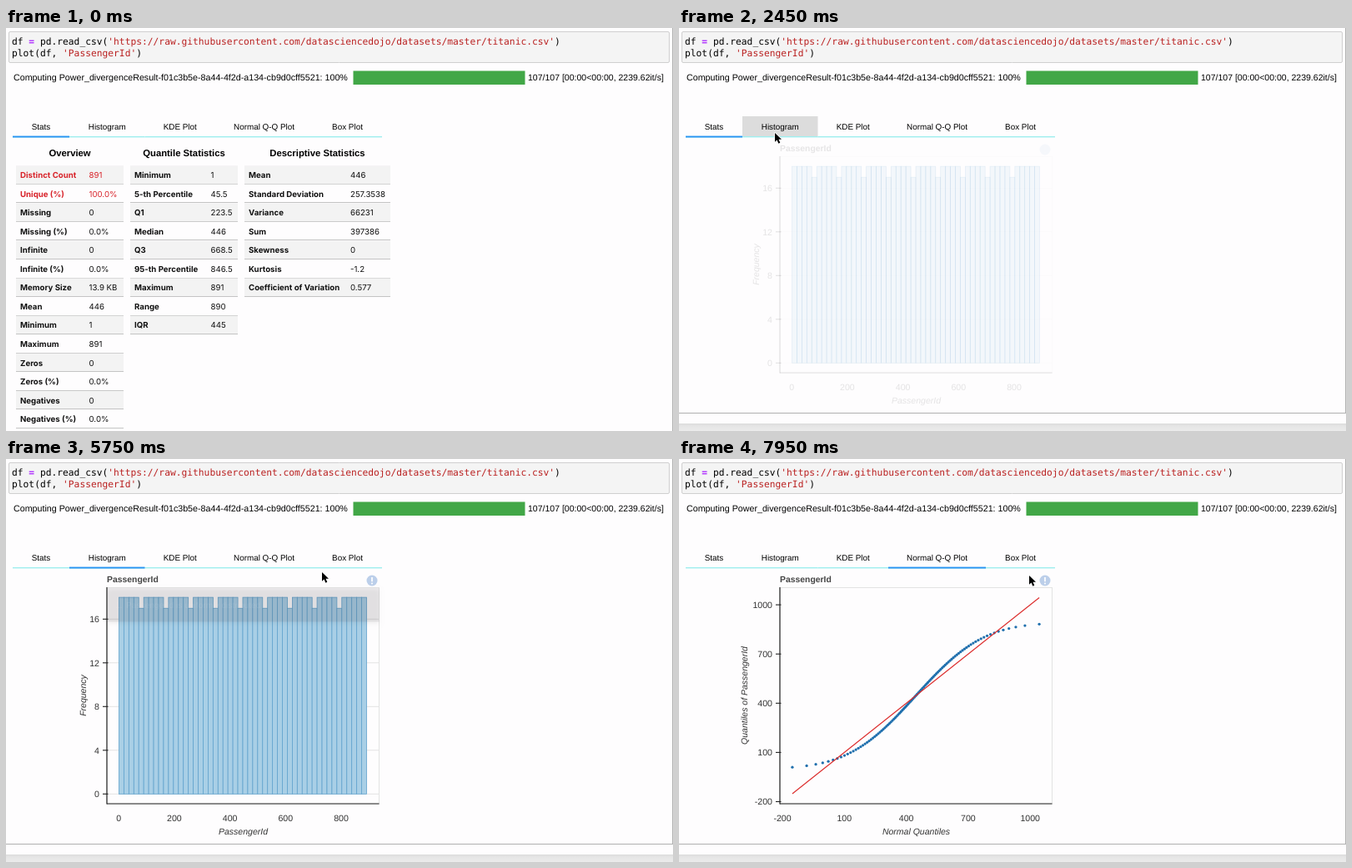
An HTML page with a canvas that plays this animation: 800 by 484 pixels, repeating every 8000 ms.

```html
<!DOCTYPE html>
<html lang="en">
<head>
<meta charset="utf-8">
<title>Column plot</title>
<style>
html, body { margin: 0; width: 100%; height: 100%; overflow: hidden; background: #fefdfe; }
canvas { display: block; width: 800px; height: 484px; }
</style>
</head>
<body>
<canvas id="stage"></canvas>
<script>
const W = 800, H = 484, LOOP = 8000, STEP = 50;
const canvas = document.getElementById('stage');
const ctx = canvas.getContext('2d');
const ratio = window.devicePixelRatio || 1;
canvas.width = W * ratio;
canvas.height = H * ratio;

const SANS = '"Liberation Sans", Arial, sans-serif';
const UI = 'Inter, "Open Sans", sans-serif';
const MONO = '"DejaVu Sans Mono", monospace';

const TABS = [
  ['Stats', 8, 76], ['Histogram', 76, 166.5], ['KDE Plot', 166.5, 251],
  ['Normal Q-Q Plot', 251, 368], ['Box Plot', 368, 451]
];
const TABLES = [
  { title: 'Overview', x: 12, right: 141, value: 99.5, rows: [
    ['Distinct Count', '891'], ['Unique (%)', '100.0%'], ['Missing', '0'],
    ['Missing (%)', '0.0%'], ['Infinite', '0'], ['Infinite (%)', '0.0%'],
    ['Memory Size', '13.9 KB'], ['Mean', '446'], ['Minimum', '1'],
    ['Maximum', '891'], ['Zeros', '0'], ['Zeros (%)', '0.0%'],
    ['Negatives', '0'], ['Negatives (%)', '0.0%']] },
  { title: 'Quantile Statistics', x: 149, right: 278, value: 245.5, rows: [
    ['Minimum', '1'], ['5-th Percentile', '45.5'], ['Q1', '223.5'],
    ['Median', '446'], ['Q3', '668.5'], ['95-th Percentile', '846.5'],
    ['Maximum', '891'], ['Range', '890'], ['IQR', '445']] },
  { title: 'Descriptive Statistics', x: 286, right: 461, value: 413, rows: [
    ['Mean', '446'], ['Standard Deviation', '257.3538'], ['Variance', '66231'],
    ['Sum', '397386'], ['Skewness', '0'], ['Kurtosis', '-1.2'],
    ['Coefficient of Variation', '0.577']] }
];
const ROW_TOP = 165.2, ROW_H = 22.56;

// Pointer keys: time, x, y
const PATH = [
  [450, 91, 492], [800, 98, 372], [900, 99, 341], [1050, 101, 300.9],
  [1400, 109, 195], [1800, 115, 126], [2750, 115, 126], [3200, 270, 137],
  [3900, 443, 146], [5500, 443, 146], [5750, 379, 136], [6100, 210, 122],
  [6600, 210, 122], [7050, 294, 122], [7450, 294, 122], [7800, 400, 139],
  [7950, 420, 140]
];
const VIEWS = [[0, 0], [2420, 1], [6350, 2], [7420, 3]];
const FADE = 230, SWITCH = 120;
const TIP_IN = 4380, TIP_OUT = 5480;

const PLOT = { x: 121, y: 154, r: 447.5, b: 414 };
const clamp = v => Math.max(0, Math.min(1, v));

function text(str, x, y, font, color = '#000', align = 'left') {
  ctx.font = font;
  ctx.fillStyle = color;
  ctx.textAlign = align;
  ctx.fillText(str, x, y);
}

function rect(x, y, w, h, color) {
  ctx.fillStyle = color;
  ctx.fillRect(x, y, w, h);
}

function line(x1, y1, x2, y2, color, width = 1) {
  ctx.strokeStyle = color;
  ctx.lineWidth = width;
  ctx.beginPath();
  ctx.moveTo(x1, y1);
  ctx.lineTo(x2, y2);
  ctx.stroke();
}

function disc(x, y, r, color) {
  ctx.fillStyle = color;
  ctx.beginPath();
  ctx.arc(x, y, r, 0, Math.PI * 2);
  ctx.fill();
}

function code(parts, x, y) {
  for (const [str, color, weight = ''] of parts) {
    text(str, x, y, `${weight} 11.27px ${MONO}`, color);
    x += ctx.measureText(str).width;
  }
}

function drawCell() {
  ctx.beginPath();
  ctx.roundRect(3.5, 4.5, 792, 37, 1.5);
  ctx.fillStyle = '#f4f4f4';
  ctx.fill();
  ctx.strokeStyle = '#cfcfcf';
  ctx.lineWidth = 1;
  ctx.stroke();
  const red = '#ba2121';
  code([['df ', '#000'], ['=', '#aa22ff', 'bold'], [' pd.read_csv(', '#000'],
    ["'https://raw.githubusercontent.com/datasciencedojo/datasets/master/titanic.csv'", red],
    [')', '#000']], 7, 20);
  code([['plot(df, ', '#000'], ["'PassengerId'", red], [')', '#000']], 7, 33.5);

  text('Computing Power_divergenceResult-f01c3b5e-8a44-4f2d-a134-cb9d0cff5521: 100%',
    9, 63, `10.69px ${SANS}`);
  rect(416.5, 51.5, 206, 16.5, '#42a747');
  text('107/107 [00:00<00:00, 2239.62it/s]', 626, 63, `10.53px ${SANS}`);
}

function drawFrame(short) {
  line(799.5, 0, 799.5, short ? 462.5 : H, '#b5b5b5');
  if (!short) return;
  line(0, 462.5, 800, 462.5, '#b0b0b0');
  const band = ctx.createLinearGradient(0, 474, 0, H);
  band.addColorStop(0, '#d8d8d8');
  band.addColorStop(0.4, '#e5e5e5');
  band.addColorStop(1, '#ebebeb');
  rect(0, 475, W, 9, band);
}

function drawTabs(active, p) {
  TABS.forEach(([name, x, r], i) => {
    if (p && p.y >= 106 && p.y < 131 && p.x >= x && p.x < r) rect(x, 106, r - x, 24.5, '#dcdcdc');
    text(name, (x + r) / 2, 121.5, `9.88px ${SANS}`, '#000', 'center');
    rect(x, 130, r - x, 1.4, '#9eeeee');
  });
  const [, x, r] = TABS[active];
  rect(x, 129.6, r - x, 1.9, '#2694f2');
}

function drawTables(p) {
  for (const { title, x, right, value, rows } of TABLES) {
    text(title, (x + right) / 2, 153.7, `bold 11.3px ${SANS}`, '#000', 'center');
    rows.forEach(([label, val], i) => {
      const y = ROW_TOP + i * ROW_H;
      const hover = p && p.x >= x && p.x < right && p.y >= y && p.y < y + ROW_H;
      rect(x, y, right - x, ROW_H, hover ? '#d0e6f9' : i % 2 ? '#fefdfe' : '#f3f3f3');
      const edge = Math.round(y + ROW_H) - 0.5;
      line(x, edge, right, edge, '#c4c4c4');
      const color = x === 12 && i < 2 ? '#d8232a' : '#111';
      const base = y + ROW_H / 2 + 3.5;
      text(label, x + 5, base, `bold 9.66px ${UI}`, color);
      text(val, value, base, `9.66px ${UI}`, color);
    });
  }
}

function drawAxes(xs, ys, xName, yName, yNameX, grid) {
  const { x, y, r, b } = PLOT;
  ctx.strokeStyle = '#e3e3e3';
  ctx.lineWidth = 1;
  ctx.strokeRect(x, y + 0.5, r - x, b - y);
  const font = `10.6px ${SANS}`;
  for (const [label, py] of ys) {
    if (grid) line(x, py, r, py, '#e3e3e3');
    text(label, 112, py + 3.8, font, '#333', 'right');
  }
  for (const [label, px] of xs) text(label, px, 434.8, font, '#333', 'center');
  text(xName, 284.5, 451.3, `italic 10.5px ${SANS}`, '#333', 'center');
  ctx.save();
  ctx.translate(yNameX, 284);
  ctx.rotate(-Math.PI / 2);
  text(yName, 0, 0, `italic 10.5px ${SANS}`, '#333', 'center');
  ctx.restore();
  text('PassengerId', x, 148, `bold 10.4px ${SANS}`, '#444');
}

function drawAxisLines(ys) {
  const { x, y, r, b } = PLOT;
  line(x, y, x, b + 0.5, '#222', 1.2);
  line(x, b, r, b, '#222', 1.2);
  for (const [, py] of ys) line(x - 5, py, x + 1.5, py, '#222', 1.1);
}

function drawBars() {
  const w = 297 / 50;
  ctx.strokeStyle = '#62a3ce';
  ctx.lineWidth = 0.8;
  for (let i = 0; i < 50; i++) {
    const h = (i % 5 === 4 && i < 49 ? 17 : 18) * 13.12;
    rect(135.5 + i * w, 402.3 - h, w, h, '#a9cfe6');
    ctx.strokeRect(135.5 + i * w, 402.3 - h, w, h);
  }
}

const ticks = (start, gap, count, pos, step, digits = 0) =>
  Array.from({ length: count }, (_, i) =>
    [i || start ? (start + i * gap).toFixed(digits) : '0', pos + i * step]);

const idTicks = ticks(0, 200, 5, 135.2, 66.7);

function drawHistogram() {
  const ys = ticks(0, 4, 5, 402.3, -52.5);
  drawAxes(idTicks, ys, 'PassengerId', 'Frequency', 95.5, true);
  drawBars();
  drawAxisLines(ys);
}

// Normal cumulative distribution, logistic approximation
const phi = z => 1 / (1 + Math.exp(-1.5976 * z - 0.07056 * z ** 3));

function quantile(p) {
  let lo = -4, hi = 4;
  for (let i = 0; i < 30; i++) {
    const mid = (lo + hi) / 2;
    if (phi(mid) < p) lo = mid; else hi = mid;
  }
  return lo;
}

function drawDensity() {
  const ys = ticks(0, 0.0003, 4, 402.3, -62.7, 4);
  drawAxes(idTicks, ys, 'PassengerId', 'Density', 72.8, true);
  drawBars();
  ctx.strokeStyle = '#8878c6';
  ctx.lineWidth = 1.2;
  ctx.beginPath();
  for (let x = 135.5; x <= 432.5; x++) {
    const d = phi((x - 135.5) / 22) + phi((432.5 - x) / 22) - 1;
    ctx.lineTo(x, 402.3 - 233.6 * d);
  }
  ctx.stroke();
  drawAxisLines(ys);
}

const NORMALS = Array.from({ length: 99 }, (_, i) => 446 + 257.35 * quantile((i + 1) / 100));

function drawQuantiles() {
  const ys = ticks(-200, 300, 5, 411.5, -59.1);
  const px = v => 124 + (v + 200) * 0.2477;
  const py = v => 411.5 - (v + 200) * 0.197;
  drawAxes(ticks(-200, 300, 5, 124, 74.3), ys, 'Normal Quantiles',
    'Quantiles of PassengerId', 82, false);
  NORMALS.forEach((v, i) => disc(px(v), py(1 + 8.9 * (i + 1)), 1.65, '#1f6fad'));
  const lo = NORMALS[0], hi = NORMALS[98];
  line(px(lo), py(lo), px(hi), py(hi), '#dc2a2a', 1.1);
  drawAxisLines(ys);
}

function drawIcon(open, hover) {
  disc(439, 146, 6.5, open || hover ? '#7292cb' : '#bccfea');
  if (open) {
    line(436.7, 143.7, 441.3, 148.3, '#fff', 1.7);
    line(441.3, 143.7, 436.7, 148.3, '#fff', 1.7);
  } else {
    line(439, 142, 439, 147.2, '#fff', 1.7);
    disc(439, 149.5, 1, '#fff');
  }
}

function drawTip(alpha) {
  if (alpha <= 0) return;
  ctx.save();
  ctx.globalAlpha = alpha;
  ctx.shadowColor = 'rgba(0,0,0,0.5)';
  ctx.shadowBlur = 5 * ratio;
  ctx.shadowOffsetY = 2 * ratio;
  rect(121.5, 155, 326, 40.5, '#4d4a4d');
  ctx.shadowColor = 'transparent';
  text('1.', 131, 179, `10.2px ${SANS}`, '#fff');
  text('PassengerId is uniformly distributed', 144, 179, `10.2px ${SANS}`, '#fff');
  ctx.restore();
}

function pointerAt(t) {
  const i = PATH.findIndex(k => k[0] >= t);
  if (i < 1) return null;
  const [t0, x0, y0] = PATH[i - 1], [t1, x1, y1] = PATH[i];
  const k = (t - t0) / (t1 - t0);
  return { x: x0 + (x1 - x0) * k, y: y0 + (y1 - y0) * k };
}

function drawPointer(p, hand) {
  ctx.save();
  ctx.translate(p.x, p.y);
  ctx.lineJoin = 'round';
  const shape = new Path2D(hand
    ? 'M-1.2 1Q0 -.5 1.2 1L2 5Q3.3 3.8 4.3 5Q5.6 4.3 6.2 5.7Q8 5.2 8 7L7.4 10.5L6.2 13H.8L-3.2 8.2Q-3.6 6.5 -1.8 7L-.2 8.3Z'
    : 'M0 0V10.8L2.5 8.5L4.4 12.7L6.3 11.8L4.5 7.7H8Z');
  ctx.strokeStyle = hand ? '#111' : '#fff';
  ctx.lineWidth = hand ? 1.1 : 1.5;
  ctx.fillStyle = hand ? '#fff' : '#000';
  ctx.stroke(shape);
  ctx.fill(shape);
  ctx.restore();
}

function draw(t) {
  ctx.setTransform(ratio, 0, 0, ratio, 0, 0);
  ctx.textRendering = 'geometricPrecision';
  rect(0, 0, W, H, '#fefdfe');
  const p = pointerAt(t);
  const [since, view] = VIEWS.filter(v => v[0] <= t).pop();
  const active = view && t - since < SWITCH ? view - 1 : view;
  const overIcon = !!p && view % 2 === 1 && Math.hypot(p.x - 439, p.y - 146) < 7;

  drawFrame(view > 0);
  drawCell();
  drawTabs(active, p);
  if (!view) {
    drawTables(p);
  } else {
    ctx.save();
    ctx.globalAlpha = clamp((t - since) / FADE);
    [drawHistogram, drawDensity, drawQuantiles][view - 1]();
    if (view !== 2) drawIcon(t >= TIP_IN && t < TIP_OUT, overIcon);
    ctx.restore();
    if (view === 1) drawTip(t < TIP_OUT ? clamp((t - TIP_IN) / 400) : 1 - clamp((t - TIP_OUT) / 300));
  }
  if (p) drawPointer(p, overIcon);
}

const begin = performance.now();
function tick() {
  const t = (performance.now() - begin) % LOOP;
  draw(Math.floor(t / STEP) * STEP);
  requestAnimationFrame(tick);
}
tick();
</script>
</body>
</html>
```
